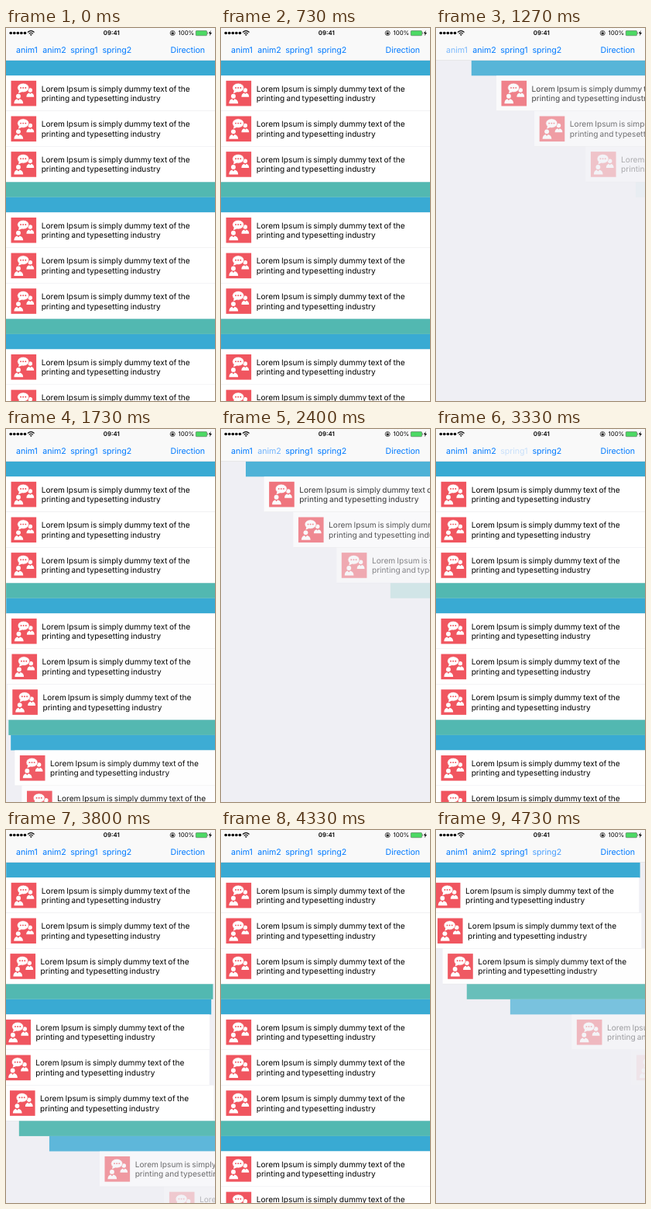
An HTML page that plays this animation: 270x480 px, repeating every 4790 ms.

```html
<!DOCTYPE html>
<html lang="en">
<head>
<meta charset="utf-8">
<title>Table reload animations</title>
<style>
  html, body { margin: 0; width: 100%; height: 100%; overflow: hidden; background: #efeff4; }
  svg { display: block; width: 100%; height: 100%; font-family: Inter, Roboto, sans-serif; }
  text { text-rendering: geometricPrecision; }
  .row { font-size: 15.5px; letter-spacing: .05px; word-spacing: -1.2px; }
  .bar { font-size: 16.3px; letter-spacing: -.1px; fill: #007aff; }
  .status { font-size: 12px; }
</style>
</head>
<body>
<svg viewBox="0 0 414 736" preserveAspectRatio="none">
  <defs>
    <g id="icon">
      <rect width="50" height="50" fill="#f0555f"/>
      <g fill="#fff">
        <circle cx="38" cy="18.5" r="4.2"/>
        <path d="M30.5 32q0-6.5 5.5-8l2 2.500 2-2.500q5.500 1.500 5.500 8z"/>
        <ellipse cx="24" cy="14" rx="11.500" ry="9" stroke="#f0555f"/>
        <path d="M16 19l-1.500 6 7-3z"/>
        <circle cx="14.500" cy="30.500" r="4.500"/>
        <path d="M6 45q0-7.500 6-9l2.500 3 2.500-3q7 1.500 7 9z"/>
      </g>
      <g fill="#f0555f">
        <circle cx="19.200" cy="14" r="1.500"/>
        <circle cx="24" cy="14" r="1.500"/>
        <circle cx="28.800" cy="14" r="1.500"/>
      </g>
    </g>
  </defs>

  <rect width="414" height="736" fill="#efeff4"/>
  <g id="table"></g>

  <rect width="414" height="64" fill="#f9f9f9"/>
  <rect y="64" width="414" height=".33" opacity=".3"/>

  <g class="status">
    <g id="signal"></g>
    <g fill="none" stroke="#000" stroke-width="1.800">
      <path d="M43 8.500q6.500-5.600 13 0M45.500 11.300q4-3.400 8 0"/>
    </g>
    <path d="M47.300 13q2.200-1.800 4.400 0l-2.200 2.300z"/>
    <text x="209" y="14.500" text-anchor="middle" font-weight="600">09:41</text>
    <g fill="none" stroke="#000">
      <circle cx="330" cy="10" r="4.700"/>
      <path d="M328.500 9.500v-1a1.500 1.500 0 0 1 3 0v1"/>
    </g>
    <rect x="327.800" y="9.300" width="4.400" height="3.500"/>
    <text x="373" y="14.500" text-anchor="end">100%</text>
    <rect x="376" y="5.500" width="22" height="9.500" rx="1.500" fill="#4cd964" stroke="#333" stroke-width=".6"/>
    <path d="M399 8.500q2 1.700 0 3.500z"/>
    <path d="M406 4.500l-4.500 6.200h2.800l-1.300 5 4.800-6.500h-3z"/>
  </g>

  <g class="bar">
    <text class="tap" x="20" y="48.500">anim1</text>
    <text class="tap" x="72.500" y="48.500">anim2</text>
    <text class="tap" x="127.500" y="48.500">spring1</text>
    <text class="tap" x="191" y="48.500">spring2</text>
    <text x="394" y="48.500" text-anchor="end">Direction</text>
  </g>
</svg>
<script>
const LOOP = 4790, WIDTH = 414, BAR_HEIGHT = 64;
const OMEGA = 21;       // spring frequency, rad/s
const STAGGER = 0.72;   // phase lag from one strip to the next
const TAPS = [
  { start: 1118, damping: 1 },
  { start: 2226, damping: 1 },
  { start: 3348, damping: 0.75 },
  { start: 4472, damping: 0.75 }
];
const PRESS = 116, FADE = 400;

const clamp = v => Math.max(0, Math.min(1, v));
const band = color => ({ height: 30, body: `<rect width="414" height="30" fill="${color}"/>` });
const header = band('#39aad3');
const footer = band('#52b8b1');
const row = {
  height: 70,
  body: `<rect width="414" height="70" fill="#fff"/>
    <rect y="69.500" width="414" height=".5" fill="#d4d4d8"/>
    <use href="#icon" x="10" y="10"/>
    <text class="row" x="70" y="31">Lorem Ipsum is simply dummy text of the</text>
    <text class="row" x="70" y="50.400">printing and typesetting industry</text>`
};

const section = [header, row, row, row, footer];
const strips = [...section, ...section, header, row, row];
let y = BAR_HEIGHT;
document.getElementById('table').innerHTML = strips.map(s => {
  const html = `<g transform="translate(0 ${y})"><g class="strip">${s.body}</g></g>`;
  y += s.height;
  return html;
}).join('');
document.getElementById('signal').innerHTML =
  [0, 1, 2, 3, 4].map(i => `<circle cx="${9.5 + 7 * i}" cy="10" r="2.800"/>`).join('');

const stripNodes = document.querySelectorAll('.strip');
const tapNodes = document.querySelectorAll('.tap');

// Remaining distance (1 to 0) of a spring released at phase 0.
function spring(phase, z) {
  if (phase <= 0) return 1;
  if (z === 1) return (1 + phase) * Math.exp(-phase);
  const d = Math.sqrt(1 - z * z);
  return Math.exp(-z * phase) * (Math.cos(d * phase) + z / d * Math.sin(d * phase));
}

function draw(t) {
  const active = TAPS.filter(tap => t >= tap.start).pop();
  stripNodes.forEach((node, i) => {
    const phase = active ? (t - active.start) / 1000 * OMEGA - i * STAGGER : 0;
    const rest = active ? spring(phase, active.damping) : 0;
    node.setAttribute('transform', `translate(${(rest * WIDTH).toFixed(2)} 0)`);
    node.setAttribute('opacity', clamp(1 - rest));
  });
  tapNodes.forEach((node, i) => {
    const since = t - TAPS[i].start;
    node.setAttribute('opacity', since < -PRESS ? 1 : 0.2 + 0.8 * clamp(since / FADE));
  });
}

const begin = performance.now();
function tick() {
  draw((performance.now() - begin) % LOOP);
  requestAnimationFrame(tick);
}
tick();
</script>
</body>
</html>
```
